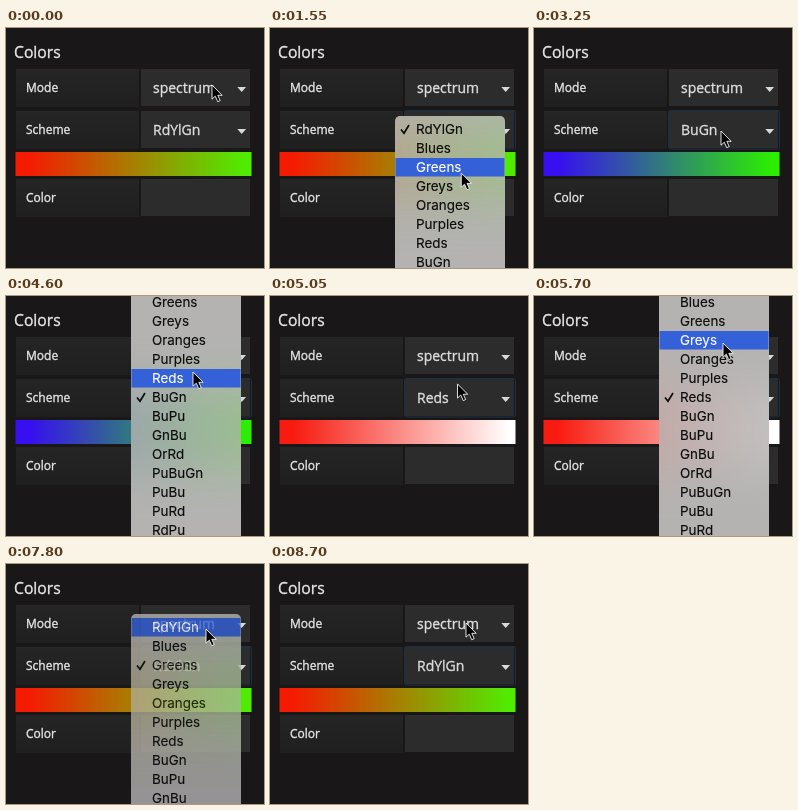
Write an HTML page that moves like this. It is 258x240 px and loops after 9.1 s.

```html
<!DOCTYPE html>
<html lang="en">
<head>
<meta charset="utf-8">
<title>Color scheme picker</title>
<style>
html, body { margin: 0; width: 100%; height: 100%; overflow: hidden; background: #1a1718; }
svg { display: block; width: 258px; height: 240px; }
text { font-family: "Open Sans", sans-serif; fill: #e6e6e6; stroke: #e6e6e6; stroke-width: .35px; }
.title { font-size: 15.7px; }
.label { font-size: 12px; }
.value { font-size: 14px; fill: #dcdcdc; stroke: #dcdcdc; }
#menu text { font-family: Inter, "Liberation Sans", sans-serif; font-size: 13.4px; fill: #0c0c0c; stroke: #0c0c0c; stroke-width: .15px; }
#menu text.on { fill: #fff; stroke: #fff; }
</style>
</head>
<body>
<svg id="stage" viewBox="0 0 258 240">
  <defs>
    <linearGradient id="ramp" gradientUnits="userSpaceOnUse" x1="9" x2="246" y1="0" y2="0">
      <stop id="from" offset=".06"/><stop id="to" offset=".97"/>
    </linearGradient>
    <linearGradient id="cell" x1="0" x2="0" y1="0" y2="1">
      <stop stop-color="#262526"/><stop offset="1" stop-color="#201f20"/>
    </linearGradient>
    <clipPath id="panelClip"><rect id="clipRect" x="125" width="110" height="400" rx="5"/></clipPath>
  </defs>
  <rect width="258" height="240" fill="#1a1718"/>
  <text class="title" x="8" y="30">Colors</text>
  <g id="rows"></g>
  <rect id="focus" x="134.5" y="82.5" width="111" height="38.5" rx="2" fill="none" stroke="#1b3147"/>
  <rect x="9.5" y="124" width="236" height="24" fill="url(#ramp)"/>
  <g id="menu">
    <g clip-path="url(#panelClip)">
      <rect x="125" y="-40" width="110" height="320" fill="#b4b3b2"/>
      <rect x="70" y="92" width="220" height="82" fill="url(#ramp)" opacity=".2" style="filter:blur(26px)"/>
    </g>
    <rect id="highlight" x="125.5" width="109" height="18.5" fill="#3461d8"/>
    <g id="items"></g>
    <path id="check" d="M131 101.5l3 3.7 5-8.2" fill="none" stroke-width="1.7"/>
  </g>
  <path id="cursor" d="M0 0V14.2L3.3 11.2L5.7 16.7L8.2 15.6L5.8 10.3H10.2Z" fill="#000" stroke="#f4f4f4" stroke-width=".9" stroke-linejoin="round"/>
</svg>
<script>
const LOOP = 9100, STEP = 50, ITEM = 19, ITEM_TOP = 92, FADE = 200;
const schemes = ["RdYlGn", "Blues", "Greens", "Greys", "Oranges", "Purples", "Reds", "BuGn",
  "BuPu", "GnBu", "OrRd", "PuBuGn", "PuBu", "PuRd", "RdPu"];
const ramps = {
  RdYlGn: ["#f51b02", "#50ec00"],
  BuGn: ["#370ff0", "#2cee00"],
  Reds: ["#f71b10", "#ffffff"],
  Greens: ["#2dee00", "#ffffff"]
};

// Each visit opens the list on the current scheme and ends by picking another.
const visits = [
  { open: 800, close: 2450, pick: "BuGn" },
  { open: 3850, close: 4650, pick: "Reds" },
  { open: 5300, close: 6400, pick: "Greens" },
  { open: 7250, close: 7800, pick: "RdYlGn" }
];

// Pointer moves: departure time and destination; the distance sets the duration.
const home = [206, 57];
const moves = [
  [300, 193, 99], [1290, 188, 230],
  [2550, 187, 103], [4100, 187, 76],
  [4950, 188, 100], [5350, 189, 47], [6000, 189, 26],
  [6620, 204, 99], [7350, 200, 65],
  [8000, 196, 59]
];

const $ = id => document.getElementById(id);
function add(parent, tag, attrs, content = "") {
  const node = document.createElementNS("http://www.w3.org/2000/svg", tag);
  for (const key in attrs) node.setAttribute(key, attrs[key]);
  node.textContent = content;
  return parent.appendChild(node);
}

function addRow(top, label, value) {
  const rows = $("rows");
  add(rows, "rect", { x: 10, y: top, width: 123, height: 38, fill: "url(#cell)" });
  add(rows, "rect", { x: 135, y: top, width: 109, height: 37, fill: "#2d2c2d" });
  add(rows, "text", { class: "label", x: 20, y: top + 23 }, label);
  if (!value) return;
  add(rows, "path", { d: `M231.3 ${top + 18}h8.8l-4.4 5z`, fill: "#d8d8d8" });
  return add(rows, "text", { class: "value", x: 147, y: top + 24 }, value);
}

addRow(41, "Mode", "spectrum");
const schemeText = addRow(83, "Scheme", "RdYlGn");
addRow(151, "Color");
const itemTexts = schemes.map(name => add($("items"), "text", { x: 146 }, name));

const smooth = k => k * k * (3 - 2 * k);

function pointerAt(t) {
  let [x, y] = home;
  for (const [depart, toX, toY] of moves) {
    if (t < depart) break;
    const duration = 100 + 4.2 * Math.hypot(toX - x, toY - y);
    const k = smooth(Math.min(1, (t - depart) / duration));
    x += (toX - x) * k;
    y += (toY - y) * k;
  }
  return [x, y];
}

function drawMenu(visit, t, checked, y) {
  const hovered = checked + Math.floor((y - ITEM_TOP) / ITEM);
  const top = ITEM_TOP - checked * ITEM;
  $("menu").setAttribute("opacity", t < visit.close ? 1 : 1 - (t - visit.close + STEP) / (FADE + STEP));
  $("clipRect").setAttribute("y", top - 4);
  $("highlight").setAttribute("y", top + hovered * ITEM);
  $("check").setAttribute("stroke", hovered === checked ? "#fff" : "#0c0c0c");
  itemTexts.forEach((node, i) => {
    node.setAttribute("y", top + i * ITEM + 14);
    node.setAttribute("class", i === hovered ? "on" : "");
  });
}

function render(time) {
  const t = Math.floor(time % LOOP / STEP) * STEP;
  const [x, y] = pointerAt(t);
  const done = visits.filter(v => t >= v.close).length;
  const name = done ? visits[done - 1].pick : "RdYlGn";
  const active = visits.findIndex(v => t >= v.open && t < v.close + FADE);

  schemeText.textContent = name;
  $("from").setAttribute("stop-color", ramps[name][0]);
  $("to").setAttribute("stop-color", ramps[name][1]);
  $("focus").style.display = t >= visits[0].open ? "" : "none";
  $("menu").style.display = active < 0 ? "none" : "";
  if (active >= 0) {
    const before = active ? visits[active - 1].pick : "RdYlGn";
    drawMenu(visits[active], t, schemes.indexOf(before), y);
  }
  $("cursor").setAttribute("transform", `translate(${x} ${y})`);
}

const start = performance.now();
function tick() {
  render(performance.now() - start);
  requestAnimationFrame(tick);
}
tick();
</script>
</body>
</html>
```
